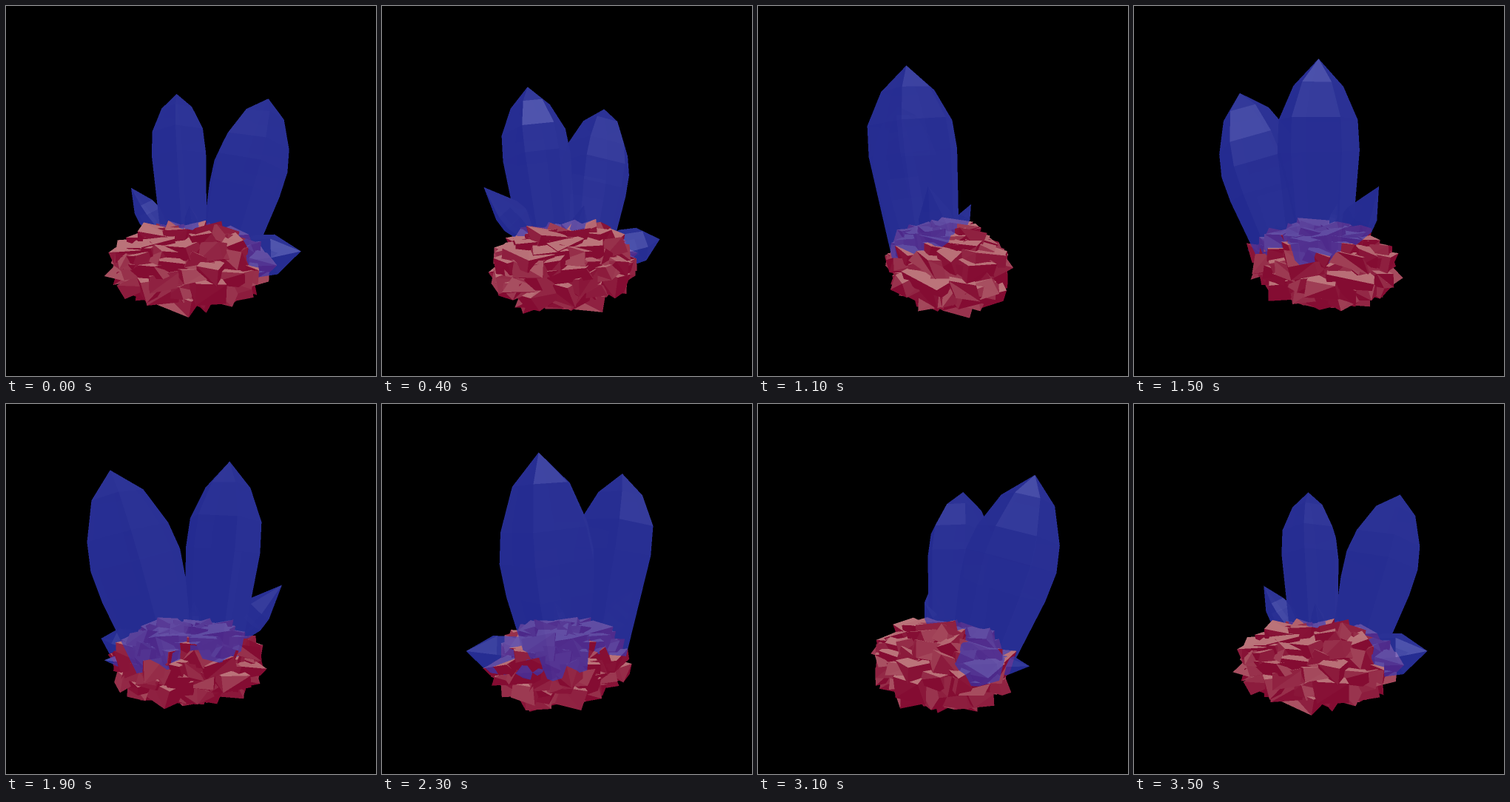
These frames come from a looping animation (500 by 500 pixels, 3600 ms). An HTML page with a canvas:

```html
<!DOCTYPE html>
<html lang="en">
<head>
<meta charset="utf-8">
<title>Crystal cluster</title>
<style>
  html, body { margin: 0; width: 100%; height: 100%; overflow: hidden; background: #000; }
  canvas { display: block; width: 500px; height: 500px; }
</style>
</head>
<body>
<canvas id="stage" width="500" height="500"></canvas>
<script>
const STEP = 100, STEPS = 36, TURN = 2 * Math.PI / 35.5;
const SS = 2, N = 500 * SS;          // supersampled buffer
const GEM_X = 255, ROCK_X = 248;     // screen position of each turning axis
const CY = 250, DIST = 433;          // horizon, camera distance

let seed = 11;
const rnd = () => {
  seed = (seed * 1664525 + 1013904223) % 4294967296;
  return seed / 4294967296;
};
const range = (a, b) => a + (b - a) * rnd();

const sub = (a, b) => [a[0] - b[0], a[1] - b[1], a[2] - b[2]];
const cross = (a, b) => [
  a[1] * b[2] - a[2] * b[1],
  a[2] * b[0] - a[0] * b[2],
  a[0] * b[1] - a[1] * b[0]
];
const dot = (a, b) => a[0] * b[0] + a[1] * b[1] + a[2] * b[2];
const unit = a => { const l = Math.hypot(...a) || 1; return a.map(v => v / l); };
const polar = (r, deg, h) => {
  const a = deg * Math.PI / 180;
  return [r * Math.sin(a), h, r * Math.cos(a)];
};

const rockTris = [], crystalTris = [];
const quad = (list, a, b, c, d) => list.push([a, b, c], [a, c, d]);

// profile: [distance from tip, radius] pairs; depth stretches the section
function crystal(tip, base, profile, depth = 1.1) {
  const axis = unit(sub(base, tip));
  const u = unit(cross(axis, [0, 0, 1])), v = cross(axis, u);
  const sides = 6, shape = [];
  for (let i = 0; i < sides; i++) {
    const a = (i + 1.5 + range(-0.06, 0.06)) / sides * 2 * Math.PI, r = range(0.97, 1.05);
    shape.push([Math.cos(a) * r / 0.866, Math.sin(a) * r * depth]);
  }
  const rings = profile.map(([d, r]) => shape.map(([p, q]) =>
    [0, 1, 2].map(k => tip[k] + axis[k] * d + r * (p * u[k] + q * v[k]))));
  for (let i = 0; i < sides; i++) {
    const j = (i + 1) % sides;
    crystalTris.push([tip, rings[0][i], rings[0][j]]);
    for (let n = 1; n < rings.length; n++)
      quad(crystalTris, rings[n - 1][i], rings[n - 1][j], rings[n][j], rings[n][i]);
  }
}

// squashed block with uneven corners
function block(center, w, h, d) {
  const yaw = range(0, 6.28), tilt = range(-0.32, 0.32), roll = range(-0.28, 0.28);
  const corners = [];
  for (let i = 0; i < 8; i++) {
    let x = (i & 1 ? w : -w) * range(0.6, 1.15);
    let y = (i & 2 ? h : -h) * range(0.5, 1.2);
    let z = (i & 4 ? d : -d) * range(0.6, 1.15);
    [x, y] = [x * Math.cos(roll) - y * Math.sin(roll), x * Math.sin(roll) + y * Math.cos(roll)];
    [y, z] = [y * Math.cos(tilt) - z * Math.sin(tilt), y * Math.sin(tilt) + z * Math.cos(tilt)];
    [x, z] = [x * Math.cos(yaw) + z * Math.sin(yaw), z * Math.cos(yaw) - x * Math.sin(yaw)];
    corners.push([center[0] + x, center[1] + y, center[2] + z]);
  }
  for (const f of ["0132", "4576", "0154", "2376", "0264", "1375"])
    quad(rockTris, ...[...f].map(i => corners[i]));
}

function rock() {
  const count = 105, mid = [-2, -96, 5];
  const place = (y, a, s) => {
    const r = Math.sqrt(1 - y * y);
    return [mid[0] + 82 * s * r * Math.cos(a), mid[1] + 43 * s * y, mid[2] + 56 * s * r * Math.sin(a)];
  };
  for (let i = 0; i < count; i++) {
    const y = 1 - 2 * (i + 0.5) / count;
    block(place(y, i * 2.39996, range(0.94, 1.02)), range(18, 28), range(8, 13), range(14, 22));
  }
  // solid core behind the blocks
  for (let i = 0; i < 6; i++) for (let j = 0; j < 12; j++) {
    const y0 = Math.cos(i * Math.PI / 6), y1 = Math.cos((i + 1) * Math.PI / 6);
    const a0 = j * Math.PI / 6, a1 = a0 + Math.PI / 6;
    quad(rockTris, place(y0, a0, 0.97), place(y0, a1, 0.97), place(y1, a1, 0.97), place(y1, a0, 0.97));
  }
}

rock();
crystal(polar(69, 204, 150.4), polar(35, 204, -72), [[30, 23], [68, 37], [104, 39], [230, 31]], 1.42);
crystal(polar(116.7, 110.8, 136.8), polar(50, 110.8, -82), [[31, 28], [74, 44], [106, 49], [142, 47], [236, 34]], 1.14);
crystal(polar(114, 239, 5), polar(58, 239, -55), [[42, 16], [60, 18], [84, 13]]);
crystal(polar(137, 66, -71), polar(60, 72, -85), [[30, 21], [56, 23], [80, 19]]);
crystal(polar(34, -11, -18), polar(12, -11, -60), [[20, 8], [45, 9]]);
crystal(polar(118, 98, -87), polar(60, 98, -92), [[26, 11], [60, 11]]);

const rockLight = unit([-0.08, 0.95, 0.28]);
const glint = unit([0.05, 0.5, 0.9]);
const rockShade = n => 0.95 * Math.max(0, dot(n, rockLight)) ** 1.4;
const crystalShade = n =>
  0.05 + 0.05 * n[1] + 0.04 * n[0] + 0.42 * Math.max(0, dot(n, glint)) ** 28;

const rockZ = new Float32Array(N * N), rockS = new Float32Array(N * N);
const gemZ = new Float32Array(N * N), gemS = new Float32Array(N * N);

function raster(tris, cx, angle, shade, plot) {
  const c = Math.cos(angle), s = Math.sin(angle);
  for (const tri of tris) {
    const p = tri.map(([x, y, z]) => [x * c + z * s, y, z * c - x * s]);
    let n = unit(cross(sub(p[1], p[0]), sub(p[2], p[0])));
    if (dot(n, sub([0, 0, DIST], p[0])) < 0) n = n.map(v => -v);
    const value = shade(n);
    const [a, b, d] = p.map(([x, y, z]) => {
      const k = DIST / (DIST - z);
      return [(cx + x * k) * SS, (CY - y * k) * SS, k];
    });
    const area = (b[0] - a[0]) * (d[1] - a[1]) - (b[1] - a[1]) * (d[0] - a[0]);
    if (Math.abs(area) < 0.01) continue;
    const x0 = Math.max(0, Math.floor(Math.min(a[0], b[0], d[0])));
    const x1 = Math.min(N - 1, Math.ceil(Math.max(a[0], b[0], d[0])));
    const y0 = Math.max(0, Math.floor(Math.min(a[1], b[1], d[1])));
    const y1 = Math.min(N - 1, Math.ceil(Math.max(a[1], b[1], d[1])));
    for (let y = y0; y <= y1; y++) for (let x = x0; x <= x1; x++) {
      const px = x + 0.5 - a[0], py = y + 0.5 - a[1];
      const v = (px * (d[1] - a[1]) - py * (d[0] - a[0])) / area;
      const w = (py * (b[0] - a[0]) - px * (b[1] - a[1])) / area;
      if (v < 0 || w < 0 || v + w > 1) continue;
      plot(y * N + x, a[2] + v * (b[2] - a[2]) + w * (d[2] - a[2]), value);
    }
  }
}

function plotRock(i, z, s) {
  if (z > rockZ[i]) { rockZ[i] = z; rockS[i] = s; }
}

// nearest facet dominates, those behind it show faintly
function plotGem(i, z, s) {
  if (z <= rockZ[i]) return;
  if (!gemZ[i]) { gemZ[i] = z; gemS[i] = s; }
  else if (z > gemZ[i]) { gemZ[i] = z; gemS[i] = gemS[i] * 0.15 + s * 0.85; }
  else gemS[i] = gemS[i] * 0.88 + s * 0.12;
}

const big = document.createElement("canvas");
big.width = big.height = N;
const bigCtx = big.getContext("2d");
const image = bigCtx.createImageData(N, N);
const ctx = document.getElementById("stage").getContext("2d");
ctx.imageSmoothingQuality = "high";

const ROCK = [[132, 12, 50], [190, 122, 126]];
const GEM = [[34, 41, 143], [140, 143, 214]];
const mix = (pair, k, t) => pair[0][k] + (pair[1][k] - pair[0][k]) * t;

function draw(step) {
  for (const buf of [rockZ, rockS, gemZ, gemS]) buf.fill(0);
  raster(rockTris, ROCK_X, step * TURN, rockShade, plotRock);
  raster(crystalTris, GEM_X, step * TURN, crystalShade, plotGem);
  const out = image.data;
  for (let i = 0; i < N * N; i++) {
    const stone = rockZ[i] > 0, gem = gemZ[i] > 0;
    for (let k = 0; k < 3; k++) {
      let v = stone ? mix(ROCK, k, rockS[i]) : 0;
      // stone hides the far side of a crystal, so less blue adds up there
      if (gem) v = v * 0.35 + mix(GEM, k, gemS[i]) * (stone ? 0.83 : 1);
      out[i * 4 + k] = v;
    }
    out[i * 4 + 3] = 255;
  }
  bigCtx.putImageData(image, 0, 0);
  ctx.drawImage(big, 0, 0, 500, 500);
}

const start = performance.now();
let shown = -1;
function tick() {
  const step = Math.floor((performance.now() - start) / STEP) % STEPS;
  if (step !== shown) draw(shown = step);
  requestAnimationFrame(tick);
}
tick();
</script>
</body>
</html>
```
